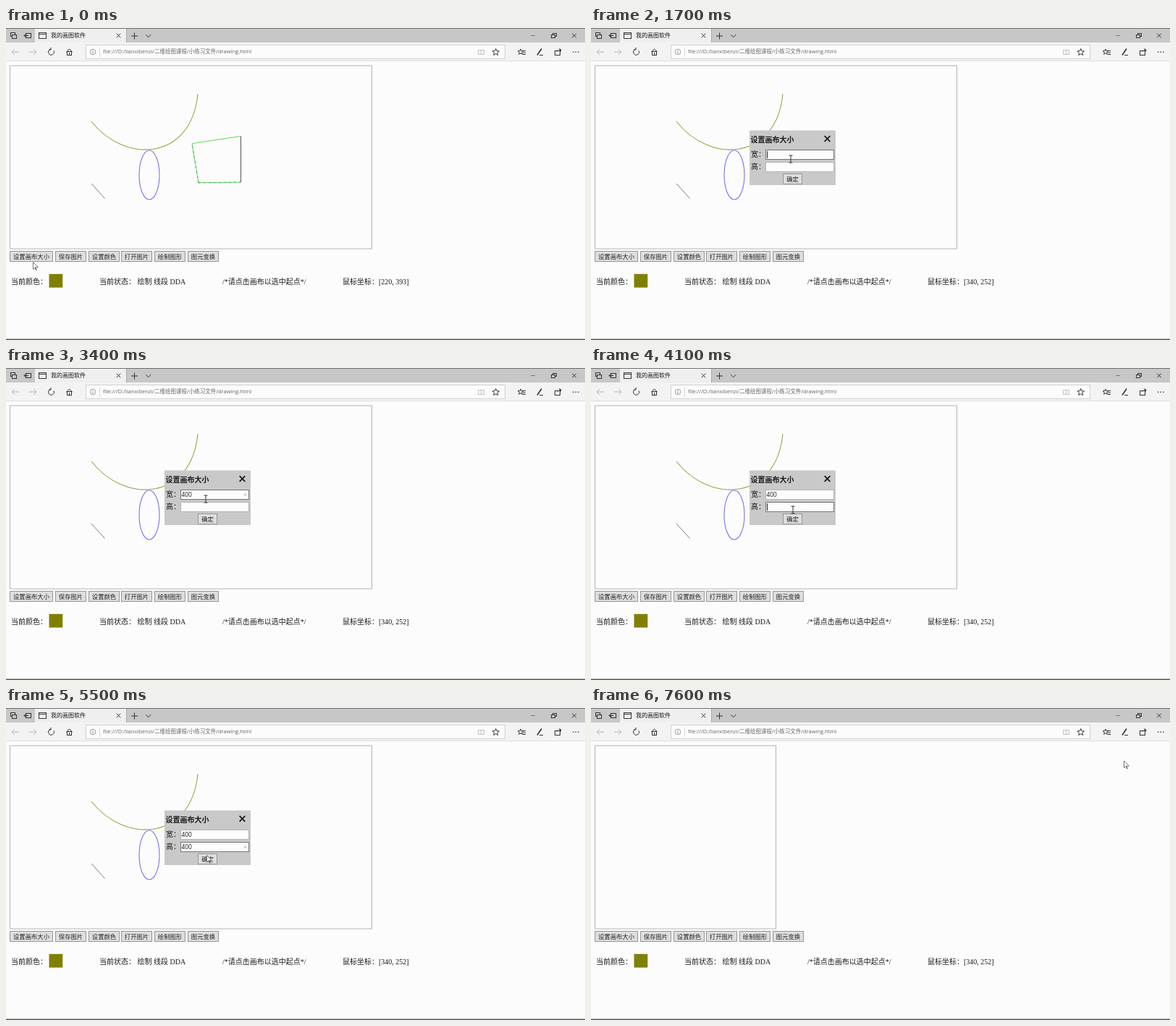
These frames come from a looping animation (800 by 431 pixels, 7.7 s). An HTML page with a canvas:

```html
<!DOCTYPE html>
<html lang="zh-CN">
<head>
<meta charset="utf-8">
<style>
html, body { margin: 0; width: 100%; height: 100%; overflow: hidden; background: #fcfcfc; }
canvas { display: block; width: 800px; height: 431px; }
</style>
</head>
<body>
<canvas id="stage"></canvas>
<script>
const LOOP = 7700, STEP = 100, SCALE = 0.625;
const OPEN_AT = 300, ENTER_AT = 1300, CLOSE_AT = 5600;
const KEY_DELAY = 800, KEY_GAP = 250, BLINK = 500;
const INK = '#333', PAPER = '#fcfcfc';
const UI = '"Open Sans", "Noto Sans CJK SC", "Noto Sans CJK", sans-serif';
const PAGE = '"Liberation Serif", "Noto Sans CJK SC", "Noto Sans CJK", serif';

const canvas = document.getElementById('stage');
const c = canvas.getContext('2d');
const dpr = window.devicePixelRatio || 1;
canvas.width = 800 * dpr;
canvas.height = 431 * dpr;

const fields = [
  { label: '宽：', y: 168, focus: 1600 },
  { label: '高：', y: 185, focus: 3700 }
];

// Pointer moves: each ends at `at` after `span` ms
const home = { x: 37.5, y: 323.5 };
const moves = [
  { at: 200, span: 100, x: 35, y: 316 },
  { at: 800, span: 550, x: 141, y: 265.4 },
  { at: ENTER_AT, span: 300, x: 217.5, y: 209.5 },
  { at: fields[0].focus, span: 300, x: 276, y: 181 },
  { at: fields[1].focus, span: 300, x: 279, y: 196 },
  { at: 5300, span: 300, x: 277.5, y: 203.5 },
  { at: 7200, span: 700, x: 756, y: 79 },
  { at: 7500, span: 200, x: 736.5, y: 73 }
];

function pointer(t) {
  let { x, y } = home;
  for (const m of moves) {
    const u = Math.max(0, Math.min(1, (t - m.at + m.span) / m.span));
    const k = u * u * (3 - 2 * u);
    x += (m.x - x) * k;
    y += (m.y - y) * k;
  }
  return [x, y];
}

function rect(x, y, w, h, fill, stroke) {
  if (fill) { c.fillStyle = fill; c.fillRect(x, y, w, h); }
  if (stroke) {
    c.strokeStyle = stroke;
    c.lineWidth = 1;
    c.strokeRect(x + 0.5, y + 0.5, w - 1, h - 1);
  }
}

function stroke(color, width) {
  c.strokeStyle = color;
  c.lineWidth = width;
  c.stroke();
}

function line(x0, y0, x1, y1, color = INK, width = 1) {
  c.beginPath();
  c.moveTo(x0, y0);
  c.lineTo(x1, y1);
  stroke(color, width);
}

function oval(x, y, rx, ry, color = INK, width = 1, from = 0, to = Math.PI * 2) {
  c.beginPath();
  c.ellipse(x, y, rx, ry, 0, from, to);
  stroke(color, width);
}

function text(str, x, y, size, font = UI, color = '#1a1a1a', weight = '') {
  c.font = `${weight} ${size}px ${font}`;
  c.fillStyle = color;
  c.fillText(str, x, y);
}

// A bent line whose tip at x, y points along the given angle
function chevron(x, y, size, angle, color = INK) {
  c.beginPath();
  for (const turn of [-0.75, null, 0.75]) {
    const r = turn === null ? 0 : size, a = angle + turn * Math.PI;
    c.lineTo(x + r * Math.cos(a), y + r * Math.sin(a));
  }
  stroke(color, 1);
}

function arrow(x, y, length, angle, color = INK) {
  line(x - length * Math.cos(angle), y - length * Math.sin(angle), x, y, color);
  chevron(x, y, length * 0.55, angle, color);
}

function cross(x, y, r, color = INK, width = 1) {
  line(x - r, y - r, x + r, y + r, color, width);
  line(x - r, y + r, x + r, y - r, color, width);
}

function star(x, y, r) {
  c.beginPath();
  for (let i = 0; i < 10; i++) {
    const a = (i / 5 - 0.5) * Math.PI, d = i % 2 ? r * 0.45 : r;
    c.lineTo(x + d * Math.cos(a), y + d * Math.sin(a));
  }
  c.closePath();
  stroke(INK, 1);
}

function button(label, x, y, w) {
  rect(x, y, w, 15, '#dedede', '#969696');
  text(label, x + (w - label.length * 8.33) / 2, y + 10.7, 8.33, UI, '#222');
}

function tabStrip() {
  rect(0, 0, 800, 20, '#c7c7c7');
  rect(0, 0, 800, 1, '#707070');
  rect(40, 1, 126, 19, '#efefef');
  rect(166, 1, 1, 19, '#aaa');

  rect(6, 6, 7, 6, null, INK);
  rect(8, 9, 7, 6, '#c7c7c7', INK);
  rect(27, 7, 8, 7, null, INK);
  arrow(25, 10.5, 6, Math.PI);

  rect(45, 6, 11, 9, null, INK);
  rect(45, 8, 11, 1, INK);
  text('我的画图软件', 62, 13.4, 8);
  cross(155.5, 10.5, 2.8);
  line(173, 11, 182, 11);
  line(177.5, 6.5, 177.5, 15.5);
  chevron(196.7, 12.7, 5, Math.PI / 2);

  line(725, 10.5, 731, 10.5, '#777');
  rect(755, 7, 6, 5, null, INK);
  rect(753, 9, 6, 5, '#c7c7c7', INK);
  cross(785, 10.5, 2.8);
}

function toolbar() {
  rect(0, 20, 800, 26, '#f3f3f3');
  rect(0, 45, 800, 1, '#dedede');
  arrow(8, 33, 10, Math.PI, '#b5b5b5');
  arrow(42, 33, 10, 0, '#b5b5b5');
  oval(62.5, 33.3, 4, 4, INK, 1, -0.5, 4.6);
  chevron(62, 30, 3, Math.PI / 4);
  chevron(87.5, 29, 6, -Math.PI / 2);
  rect(84, 32, 7, 6, null, INK);
  rect(87, 34, 1, 3, INK);

  rect(110, 23, 580, 20, PAPER, '#d0d0d0');
  oval(120, 33, 3.8, 3.8, '#888', 0.8);
  line(120, 32.3, 120, 35.3, '#888');
  line(120, 30.6, 120, 31.4, '#888');
  rect(129, 27, 1, 13, '#d8d8d8');
  text('file:///D:/lianxibenzi/二维绘图课程/小练习文件/drawing.html', 134, 34.8, 7.5, UI, '#666');
  rect(652, 30, 5, 7, null, '#c4c4c4');
  rect(656, 30, 5, 7, null, '#c4c4c4');
  star(676.7, 33.5, 5);

  star(711, 33, 4);
  for (let i = 0; i < 3; i++) {
    line(714, 31.5 + i * 2.5, 718, 31.5 + i * 2.5);
    rect(783 + i * 3.6, 32.6, 1.4, 1.4, INK);
  }
  line(734, 37.5, 740, 28.5, INK, 1.6);
  line(737, 37.5, 742, 37.5);
  rect(758, 31, 8, 7, null, INK);
  arrow(767, 30, 6, -0.4);
}

function drawing() {
  c.beginPath();
  c.moveTo(118, 129);
  c.bezierCurveTo(164, 188, 256, 184, 265, 91);
  stroke('#a2a248', 1.1);
  oval(198, 203, 14, 34, '#7474f2', 1.1);
  line(118, 215, 136.5, 235.5, '#7c6474', 0.9);

  const green = '#55dc55';
  line(257, 159.5, 324.5, 149.5, green);
  line(324.5, 149.5, 324.5, 213, '#555');
  line(324.5, 213, 266, 213.8, green);
  line(266, 213.8, 257, 159.5, green);
  c.setLineDash([2, 5]);
  line(324.5, 213, 266, 213.8, '#567a56');
  line(266, 213.8, 257, 159.5, '#567a56');
  c.setLineDash([]);
}

// The readout trails the pointer and stops once the dialog is in the way
function coordinates(t) {
  const [x, y] = pointer(Math.min(t - STEP, ENTER_AT));
  if (y > 305) return [220, 393];
  return [(x - 5) / SCALE, (y - 52) / SCALE].map(Math.round);
}

function page(t) {
  const cleared = t >= CLOSE_AT;
  rect(5, 51.5, cleared ? 251 : 501, 254, PAPER, '#b4b4b4');
  if (!cleared) drawing();

  let x = 5;
  for (const label of ['设置画布大小', '保存图片', '设置颜色', '打开图片', '绘制图形', '图元变换']) {
    const w = label.length * 8.33 + 10;
    button(label, Math.round(x), 308, Math.round(w));
    x += w + 2.6;
  }

  text('当前颜色：', 7, 353.5, 10, PAGE);
  rect(59.5, 339.8, 18.75, 18.75, '#808000');
  text('当前状态： 绘制 线段 DDA', 129, 353.5, 10, PAGE);
  text('/*请点击画布以选中起点*/', 299, 353.5, 10, PAGE);
  text(`鼠标坐标：[${coordinates(t).join(', ')}]`, 465, 353.5, 10, PAGE);
}

function field({ label, y, focus }, focused, t) {
  const first = focus + KEY_DELAY;
  const count = Math.max(0, Math.min(3, Math.floor((t - first) / KEY_GAP) + 1));
  const value = '400'.slice(0, count);
  text(label, 221, y + 10, 10, PAGE);
  rect(241, y, 95, 14, PAPER, focused ? '#747474' : '#b4b4b4');
  text(value, 242.5, y + 9.8, 8.33);
  if (!focused) return;
  if (value) cross(330.5, y + 7, 1.5, '#999', 0.8);
  const last = count ? first + (count - 1) * KEY_GAP : focus;
  if (Math.floor((t - last) / BLINK) % 2 === 0) {
    rect(243 + c.measureText(value).width, y + 2, 1, 10, '#222');
  }
}

function dialog(t) {
  rect(219, 141.5, 119, 75.5, '#c9c9c9');
  text('设置画布大小', 220.5, 157.7, 10, UI, '#1a1a1a', 'bold');
  cross(326.5, 153, 3.8, '#1a1a1a', 1.8);
  const active = fields.filter(f => t >= f.focus).pop();
  for (const f of fields) field(f, f === active, t);
  button('确定', 265, 201, 27);
}

function cursor(t) {
  const [x, y] = pointer(t);
  c.save();
  c.translate(x, y);
  if (t >= 1500 && t < 5200) {
    line(0, -5, 0, 5);
    for (const end of [-5, 5]) line(-2.5, end, 2.5, end);
  } else {
    line(2.8, 7, 4.5, 11, '#666', 1.6);
    c.beginPath();
    c.moveTo(0, 0);
    c.lineTo(0, 9.8);
    c.lineTo(2.4, 7.4);
    c.lineTo(6.8, 7);
    c.closePath();
    c.fillStyle = '#fff';
    c.fill();
    stroke('#666', 0.9);
  }
  c.restore();
}

function frame(now) {
  const t = Math.floor(now % LOOP / STEP) * STEP;
  c.setTransform(dpr, 0, 0, dpr, 0, 0);
  rect(0, 0, 800, 431, PAPER);
  tabStrip();
  toolbar();
  page(t);
  if (t >= OPEN_AT && t < CLOSE_AT) dialog(t);
  rect(0, 429.5, 800, 1.5, '#555');
  cursor(t);
}

const start = performance.now();
function tick() {
  frame(performance.now() - start);
  requestAnimationFrame(tick);
}
tick();
</script>
</body>
</html>
```
